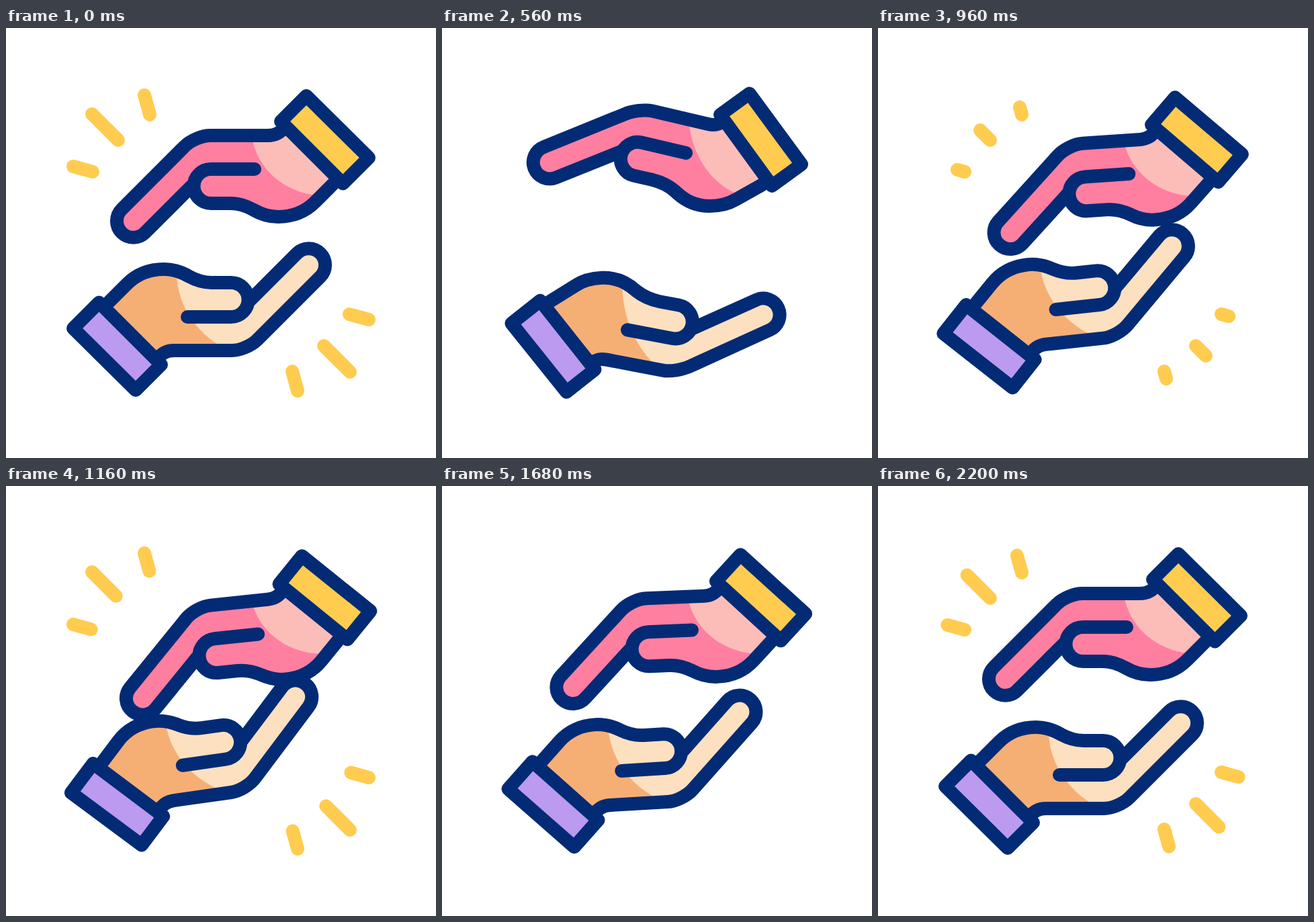
Animation, 640 px wide and 640 px high, one loop 2.24 s. Source, as an HTML page:

```html
<!DOCTYPE html>
<html>
<head>
<meta charset="utf-8">
<style>
html, body { margin: 0; width: 100%; height: 100%; overflow: hidden; background: #fff; }
svg { display: block; width: 100vw; height: 100vh; }
path { stroke-linecap: round; stroke-linejoin: round; }
.line { fill: none; stroke: #032b75; stroke-width: 20; }
.rays { fill: none; stroke: #ffcc50; stroke-width: 20; }
</style>
</head>
<body>
<svg viewBox="0 0 640 640"></svg>
<script>
const LOOP = 2240;
const PIVOT = '474.3 166.3';
const KEYS = [0, 520, 1080, 2160];
const OPENNESS = [0, 1, 0, 0];

// Outlines of the bent and the stretched hand; "|" separates finger and thumb.
const BENT = 'M414 149C408 155 402 160 390 160L304 160C292 160 275 167 266 176L172 270A1 1 0 0 0 207 304.5L278 233.5' +
  '|370 210L305 210A1 1 0 0 0 305 261L334 261C347 261 358 265 368 270.5C380 277.5 392 281 405 281C427 281 446 273 460 259L487 232';
const STRETCHED = 'M414 149C408 154 403 156.3 393.4 155.5L308.3 149.2C297.6 148.4 279.6 153.2 268.5 160.1L156.6 227.1A1 1 0 0 0 181.6 269.3L273.2 215' +
  '|367.5 203.1L299.9 198.1A1 1 0 0 0 295.7 248.4L324.4 250.4C340.8 251.9 351.6 256.3 360.6 261.9C375.5 272.7 393.7 279 414.4 275.7C428.3 273.5 441.6 268.3 452.3 259.5L487 232';
const WRIST_END = 'L405 279L460 259L487 232L414 149Z';

const HANDS = [
  {
    turn: '', angles: [0, 9.2, -6, 0],
    skin: '#ff7fa1', wrist: '#fcbdb9', cuff: '#ffcc50',
    shade: ['M366 162C374 212 416 244 462 249', 'M365 157C378 211 418 245 455 252'],
    wristEnd: 'L487 232L414 149Z'
  },
  {
    turn: 'rotate(180 320 320)', angles: [0, 6.8, -8.2, 0],
    skin: '#fde0bf', wrist: '#f5af75', cuff: '#bb9af0',
    shade: ['M316 164C355 185 384 225 386 272', 'M314 152C350 174.5 378 220.6 383 271.5'],
    wristEnd: WRIST_END
  }
];

// Each ray runs from its inner to its outer end.
const RAYS = [[167, 167, 128, 128], [214, 129, 206, 100], [129, 214, 100, 206]];

const clamp = x => Math.max(0, Math.min(1, x));
const mix = (a, b, u) => a + (b - a) * u;
const ramp = (t, from, to) => clamp((t - from) / (to - from));

function keyed(values, t) {
  for (let i = 1; i < KEYS.length; i++) {
    if (t < KEYS[i]) {
      const u = ramp(t, KEYS[i - 1], KEYS[i]);
      return mix(values[i - 1], values[i], (1 - Math.cos(Math.PI * u)) / 2);
    }
  }
  return values.at(-1);
}

function morph(a, b, u) {
  const targets = b.match(/[\d.]+/g);
  let i = 0;
  return a.replace(/[\d.]+/g, n => +mix(+n, +targets[i++], u).toFixed(2));
}

function rays(t) {
  let start, end;
  if (t < 600) [start, end] = [ramp(t, 0, 330), 1];
  else if (t < 1600) [start, end] = [ramp(t, 1140, 1390), ramp(t, 850, 1140)];
  else [start, end] = [0, ramp(t, 1907, LOOP)];
  if (end <= start) return '';
  const d = RAYS.map(([x, y, X, Y]) =>
    `M${mix(x, X, start)} ${mix(y, Y, start)}L${mix(x, X, end)} ${mix(y, Y, end)}`).join('');
  return `<path class="rays" d="${d}"/>`;
}

function hand(h, t) {
  const open = keyed(OPENNESS, t);
  const outline = morph(BENT, STRETCHED, open);
  const shade = morph(h.shade[0], h.shade[1], open) + h.wristEnd;
  return `<g transform="${h.turn}">${rays(t)}
    <g transform="rotate(${keyed(h.angles, t)} ${PIVOT})">
      <path fill="${h.skin}" d="${outline.replace('|', 'L')}Z"/>
      <path fill="${h.wrist}" d="${shade}"/>
      <path class="line" d="${outline.replace('|', 'M')}"/>
      <path class="line" style="fill:${h.cuff}" d="M447 101L540 193L501.5 231.5L409 139Z"/>
    </g></g>`;
}

const svg = document.querySelector('svg');
function draw() {
  const t = performance.now() % LOOP;
  svg.innerHTML = HANDS.map(h => hand(h, t)).join('');
  requestAnimationFrame(draw);
}
draw();
</script>
</body>
</html>
```
